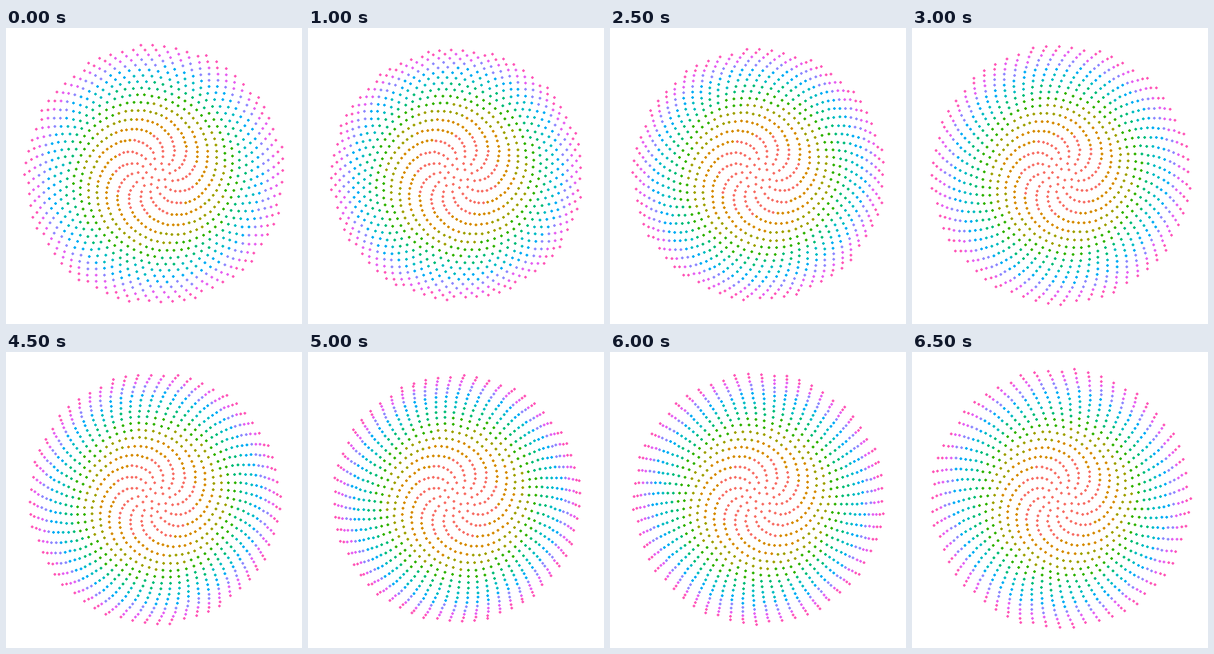
Animation of 430x430 px, one loop 8 s. Source, as an HTML page with a canvas:

```html
<!DOCTYPE html>
<html lang="en">
<head>
<meta charset="utf-8">
<title>Phyllotaxis</title>
<style>
  html, body { margin: 0; width: 100%; height: 100%; overflow: hidden; background: #fff; }
  canvas { display: block; width: 430px; height: 430px; image-rendering: pixelated; }
</style>
</head>
<body>
<canvas id="stage" width="430" height="430"></canvas>
<script>
const COUNT = 1000, RADIUS = 189.1, CENTER_X = 216.1, CENTER_Y = 213;
const COLORS = ['#F8766D', '#D89000', '#A3A500', '#39B600', '#00BF7D',
                '#00BFC4', '#00B0F6', '#9590FF', '#E76BF3', '#FF62BC'];
const TURNS = [0.6165, 0.6166, 0.6167];  // turn between neighbouring seeds, per pose
const TICK = 500, STEPS = 5;             // each pose reaches the next in five equal steps
const SCHEDULE = [0, 0, 1, 2, 3, 4, 5, 5, 5, 6, 7, 8, 9, 10, 10, 10];

const canvas = document.getElementById('stage');
const ctx = canvas.getContext('2d');

function seed(n, turn) {
  const angle = 2 * Math.PI * n * turn;
  const r = RADIUS * Math.sqrt(n / COUNT);
  return [CENTER_X + r * Math.cos(angle), CENTER_Y - r * Math.sin(angle)];
}

// A crisp four-pixel dot without corners, snapped to the pixel grid.
function dot(x, y, color) {
  x = Math.round(x);
  y = Math.round(y);
  ctx.fillStyle = color;
  ctx.fillRect(x - 1, y - 2, 2, 4);
  ctx.fillRect(x - 2, y - 1, 4, 2);
}

// Seeds travel in straight lines between poses.
function draw(step) {
  const pose = Math.min(Math.floor(step / STEPS), TURNS.length - 2);
  const mix = step / STEPS - pose;
  ctx.fillStyle = '#fff';
  ctx.fillRect(0, 0, canvas.width, canvas.height);
  for (let n = 1; n <= COUNT; n++) {
    const [x0, y0] = seed(n, TURNS[pose]);
    const [x1, y1] = seed(n, TURNS[pose + 1]);
    const color = COLORS[Math.floor((n - 1) * COLORS.length / COUNT)];
    dot(x0 + (x1 - x0) * mix, y0 + (y1 - y0) * mix, color);
  }
}

const start = performance.now();
let shown = -1;
function frame() {
  const tick = Math.floor((performance.now() - start) / TICK) % SCHEDULE.length;
  const step = SCHEDULE[tick];
  if (step !== shown) draw(shown = step);
  requestAnimationFrame(frame);
}
frame();
</script>
</body>
</html>
```
